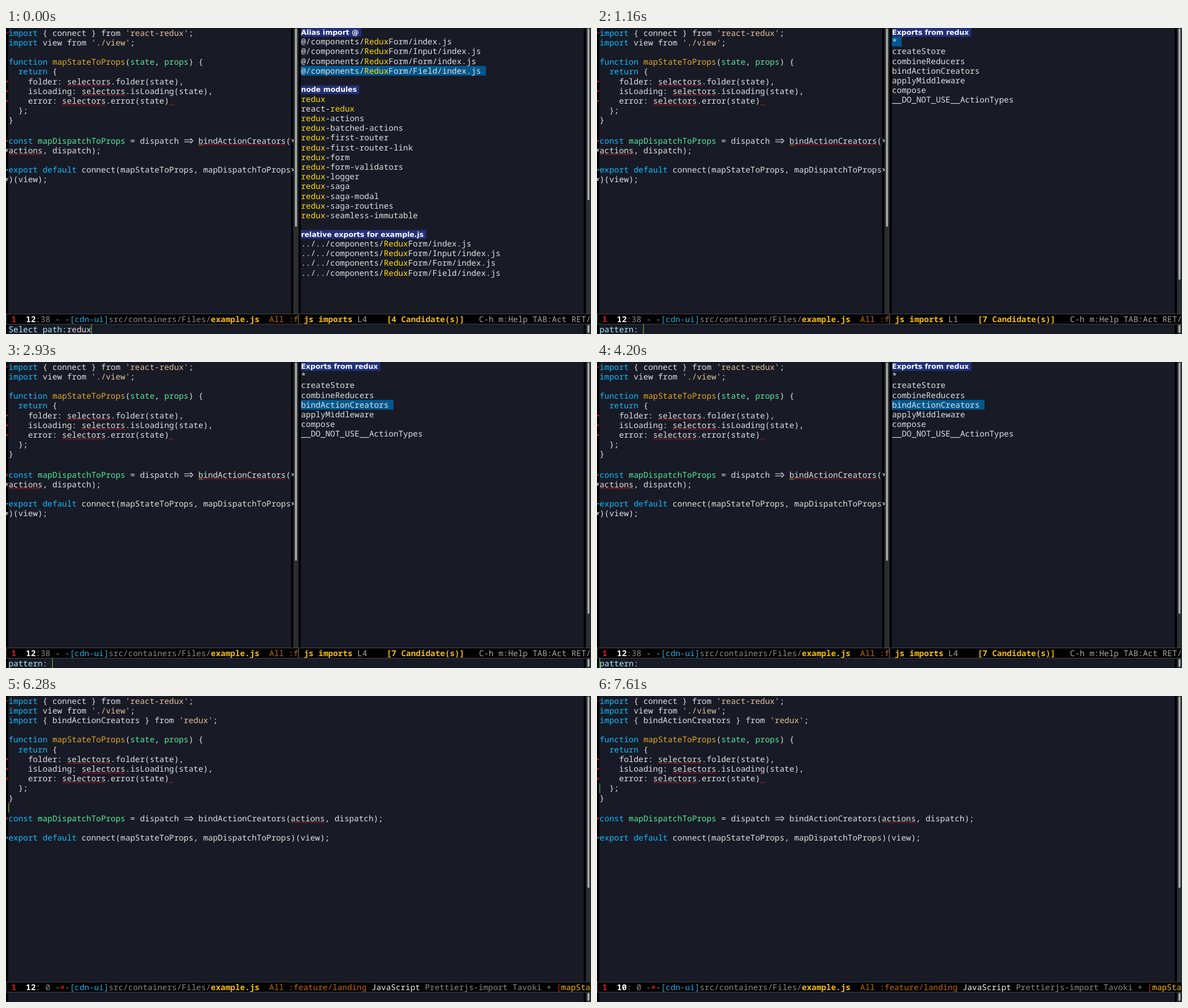
Recreate the animation shown at these times as an HTML page with a canvas. Size 1034 px wide and 542 px high, loop 8 s.

```html
<!DOCTYPE html>
<html lang="en">
<head>
<meta charset="utf-8">
<title>Import picker in an editor</title>
<style>
  html, body { margin: 0; overflow: hidden; background: #181a26; }
  canvas { display: block; }
</style>
</head>
<body>
<canvas id="stage" width="1034" height="542"></canvas>
<script>
const ctx = document.getElementById('stage').getContext('2d');
const LOOP = 8000, CELL = 8.6, LINE = 17.2, BASE = 13.6;
const CODE_X = 4.5, LIST_X = 521.5, HEADER_H = 15.5, TALL = 1.7;
const BG = '#181a26', CURSOR = '#56a02c', RED = '#d01414';
const MONO = '14.333px "Noto Sans Mono", monospace';
const HEADER = 'bold 12.47px "DejaVu Sans", sans-serif';

// Markup «kword»: the first letter picks a style, capitals are bold.
const STYLES = {
  d: '#e0e0e0', u: '#e0e0e0', k: '#0cbcff', s: '#e2c094', f: '#e2aa22', v: '#54ea94',
  y: '#ffdc00', g: '#8c8c8c', h: '#a8a8a8', b: '#1cb2ee', o: '#c06a0c', w: '#f4f4f4',
  W: '#ffffff', R: '#e01818', r: '#e01818', Y: '#f5bc0c', m: '#f5bc0c', p: '#aaf0fc'
};

const ALIASES = ['index.js', 'Input/index.js', 'Form/index.js', 'Field/index.js'];
const SUFFIXES = ['actions', 'batched-actions', 'first-router', 'first-router-link', 'form',
  'form-validators', 'logger', 'saga', 'saga-modal', 'saga-routines', 'seamless-immutable'];
const PATHS = [
  ['Alias import @', ALIASES.map(p => '@/components/ReduxForm/' + p)],
  ['node modules', ['redux', 'react-redux', ...SUFFIXES.map(s => 'redux-' + s)]],
  ['relative exports for example.js', ALIASES.map(p => '../../components/ReduxForm/' + p)]
];
const EXPORTS = [['Exports from redux', ['*', 'createStore', 'combineReducers',
  'bindActionCreators', 'applyMiddleware', 'compose', '__DO_NOT_USE__ActionTypes']]];

// [time, row, column] of the caret once the picker has closed
const CARET = [[4250, 12, 39], [6280, 11, 0], [6760, 10, 0], [7080, 9, 0], [7360, 8, 33], [7530, 9, 0]];
// [from, to, cells] of matching brackets
const PARENS = [[6920, 7210, [[4, 39], [10, 0]]], [7490, 7610, [[8, 26], [8, 32]]]];

function rect(x, y, w, h, color) {
  ctx.fillStyle = color;
  ctx.fillRect(x, y, w, h);
}

function stroke(points, color, width = 1) {
  ctx.strokeStyle = color;
  ctx.lineWidth = width;
  ctx.beginPath();
  points.forEach(([x, y]) => ctx.lineTo(x, y));
  ctx.stroke();
}

function wave(x, y) {
  const q = CELL / 4;
  stroke([0, 1, 2, 3, 4].map(i => [x + i * q, y + (i % 2 ? 0.5 : -0.5)]), '#c81a20');
}

function doubleArrow(x, y) {
  for (const d of [-1.9, 1.9]) stroke([[x + 1, y + d], [x + 14.5, y + d]], STYLES.d, 1.1);
  stroke([[x + 12, y - 4.4], [x + 16.4, y], [x + 12, y + 4.4]], STYLES.d, 1.1);
}

function wrapMark(x, y, dir) {
  stroke([[x - 2 * dir, y - 2], [x + dir, y - 1], [x + dir, y + 1], [x - dir, y + 2]], '#f0f0f0', 1.3);
}

// Draws marked-up text on the character grid; returns the number of wrapped rows.
function write(markup, x, y, columns = Infinity) {
  let col = 0, row = 0;
  for (const [, tag, marked, plain] of markup.matchAll(/«(.)(.*?)»|([^«]+)/g)) {
    const style = tag || 'd';
    ctx.font = (/[A-Z]/.test(style) ? 'bold ' : '') + MONO;
    for (const ch of marked ?? plain) {
      if (col >= columns) {
        wrapMark(506.5, y + row * LINE + 8.6, 1);
        row++;
        col = 0;
        wrapMark(1.8, y + row * LINE + 8.6, -1);
      }
      const cx = x + col * CELL, base = y + row * LINE + BASE;
      if (ch === '⇒') {
        doubleArrow(cx, base - 4.6);
        col += 2;
        continue;
      }
      ctx.fillStyle = STYLES[style];
      if (ch !== ' ') ctx.fillText(ch, cx, base);
      if (style === 'u') wave(cx, base + 2.2);
      col++;
    }
  }
  return row;
}

function scrollBar(x, thumbEnd, y = 0, h = 506) {
  rect(x - 4, y, 4, h, '#000');
  rect(x, y, 9, h, '#2a2e31');
  ctx.fillStyle = '#a9abac';
  ctx.beginPath();
  ctx.roundRect(x + 2.8, y + 1, 3.5, thumbEnd - y - 1, 1.75);
  ctx.fill();
}

function modeLine(x, w, markup) {
  rect(x, 506, w, 19, '#000');
  write(markup, x + 0.9, 507.3);
  ctx.strokeStyle = '#43454b';
  ctx.lineWidth = 1;
  ctx.strokeRect(x + 0.5, 506.5, w - 1, 18);
}

function codeLines(t, split) {
  const binder = t < 4780 ? '«ubindActionCreators»' : 'bindActionCreators';
  return [
    "«kimport» { connect } from «s'react-redux'»;",
    "«kimport» view from «s'./view'»;",
    ...(split ? [] : ["«kimport» { bindActionCreators } from «s'redux'»;"]),
    '',
    '«kfunction» «fmapStateToProps»(«vstate», «vprops») {',
    '  «kreturn» {',
    '    folder: «uselectors».folder(state),',
    '    isLoading: «uselectors».isLoading(state),',
    '    error: «uselectors».error(state)«u »',
    '  };',
    '}',
    '',
    `«kconst» «vmapDispatchToProps» = dispatch ⇒ ${binder}(«uactions», dispatch);`,
    '',
    '«kexport» «kdefault» connect(mapStateToProps, mapDispatchToProps)(view);'
  ];
}

function drawCode(t, split) {
  let y = 0;
  codeLines(t, split).forEach((line, i) => {
    if (line.includes('⇒')) y += TALL;
    const mid = y + 8.8;
    if (i === 0) rect(0, mid - 0.7, 4, 1.4, RED);
    if (line.includes('«u')) {
      ctx.fillStyle = RED;
      ctx.beginPath();
      ctx.moveTo(0.5, mid - 2.5);
      ctx.lineTo(4.3, mid);
      ctx.lineTo(0.5, mid + 2.5);
      ctx.fill();
    }
    if (line.startsWith('«kexport')) rect(1, mid - 1.5, 2.5, 2.5, '#8b83a8');
    y += LINE * (1 + write(line, CODE_X, y, split ? 58 : Infinity));
  });
}

function drawList(groups, selected, highlight) {
  let y = 0;
  for (const [title, items] of groups) {
    ctx.font = HEADER;
    rect(LIST_X - 0.5, y, ctx.measureText(title + ' ').width + 0.5, HEADER_H, '#22307a');
    ctx.fillStyle = '#fff';
    ctx.fillText(title, LIST_X, y + 11.8);
    y += HEADER_H;
    for (const item of items) {
      if (item === selected) rect(LIST_X - 0.5, y, (item.length + 1) * CELL + 0.5, LINE, '#00588f');
      write(highlight ? item.replace(/redux/i, '«y$&»') : item, LIST_X, y);
      y += LINE;
    }
    y += LINE;
  }
}

function fileStatus(row, col, fixed, dirty) {
  const place = `«W${String(row + 1).padStart(2)}»«g:${String(col).padStart(2)} -»`;
  return ` ${fixed ? '«R1»' : '«g1»'}  ${place}${dirty ? '«R×»' : ' '}«g-»«b[cdn-ui]»` +
    '«gsrc/containers/Files/»«Yexample.js»  «oAll :feature/landing» «wJavaScript» ' +
    `«gPrettierjs-import Tavoki +» ${fixed ? '«r[»' : '«g[»'}«mmapStateToProps]»`;
}

function drawPicker(t) {
  const paths = t < 1160;
  const pick = paths ? +(t >= 370) : [2310, 2590, 2930].filter(at => t >= at).length;
  const [, items] = paths ? PATHS[pick] : EXPORTS[0];
  const index = paths ? (pick ? 0 : 3) : pick;

  scrollBar(508, 352);
  rect(517, 0, 4, 506, '#000');
  scrollBar(1025, paths ? 305 : 446);
  drawCode(t, true);
  rect(CODE_X + 39 * CELL, 207, CELL, 1, CURSOR);
  drawList(paths ? PATHS : EXPORTS, items[index], paths);

  modeLine(0, 517, fileStatus(11, 38, true, false));
  const count = `[${items.length} Candidate(s)]`.padEnd(19);
  modeLine(517, 517, ` «Yjs imports» «hL${index + 1}»    «Y${count}»«hC-h m:Help TAB:Act RET/f1»`);

  write(paths ? '«pSelect path:»redux' : '«ppattern:»', CODE_X, 525);
  const closing = paths ? t >= 1110 : t >= 4200;
  rect(CODE_X - 0.5 + (closing ? 0 : paths ? 17 : 9) * CELL, 525, 1.5, 17, CURSOR);
}

function drawEditor(t) {
  const [, row, col] = CARET.findLast(([at]) => t >= at);
  for (const [from, to, cells] of PARENS) {
    if (t < from || t >= to) continue;
    for (const [r, c] of cells) rect(CODE_X + c * CELL, r * LINE, CELL, LINE, '#4f94cd');
  }
  drawCode(t, false);
  rect(CODE_X - 0.5 + col * CELL, row * LINE, 1.5, LINE + (row === 12 ? TALL : 0), CURSOR);
  scrollBar(1025, 340);
  modeLine(0, 1034, fileStatus(row, col === 39 ? 38 : col, t >= 4780, true));
}

function draw(now) {
  const t = now % LOOP;
  ctx.textRendering = 'geometricPrecision';
  rect(0, 0, 1034, 542, BG);
  rect(0, 0, 4, 542, '#000');
  scrollBar(1025, 540, 525, 17);
  if (t < 4250) drawPicker(t);
  else drawEditor(t);
}

const start = performance.now();
function tick() {
  draw(performance.now() - start);
  requestAnimationFrame(tick);
}
tick();
</script>
</body>
</html>
```
